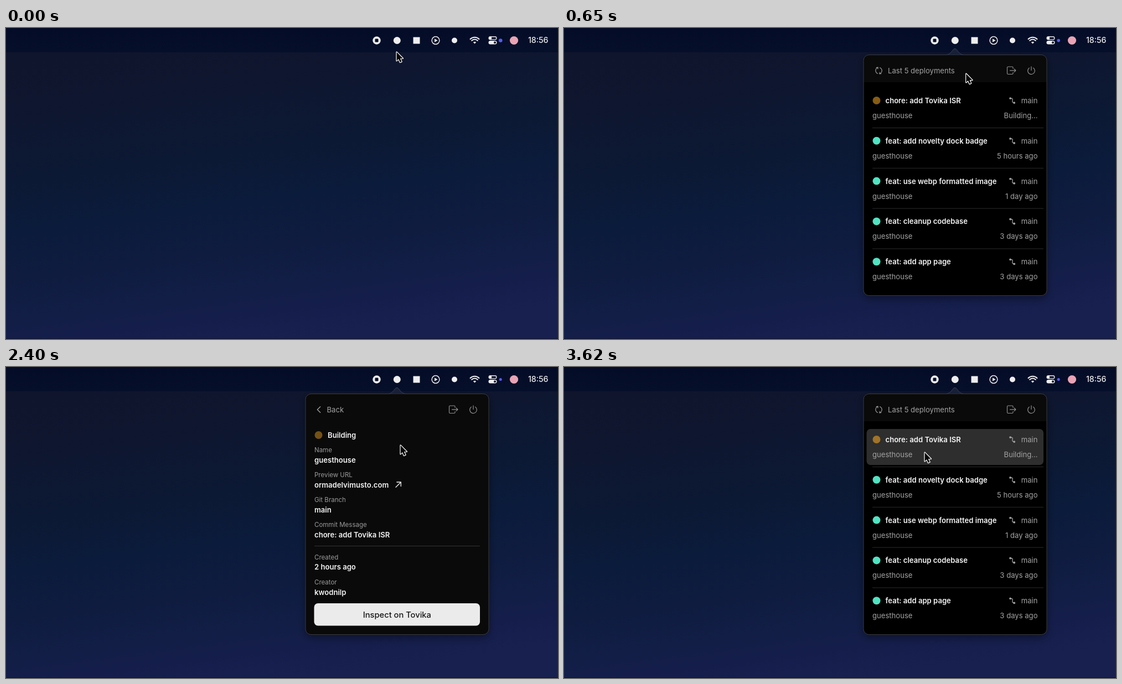
An HTML page with a canvas for the animation above (3.69 s loop, 997x562 px).

```html
<!DOCTYPE html>
<html lang="en">
<head>
<meta charset="utf-8">
<title>Deployments menu</title>
<style>
  html, body { margin: 0; width: 100%; height: 100%; overflow: hidden; background: #0c1a38; }
  canvas { display: block; width: 997px; height: 562px; }
</style>
</head>
<body>
<canvas id="stage" width="997" height="562"></canvas>
<script>
const ctx = document.getElementById('stage').getContext('2d');
const W = 997, H = 562, LOOP = 3690, STEP = 50;
const OPEN = 250, DETAIL = 1950, BACK = 3200;
const GREY = '#a3a3a3', WHITE = '#f5f5f5', GREEN = '#50e3c2', LINE = '#2b2b2b';
const PANEL = { x: 541, y: 48.5, w: 331, h: 435, r: 10 };
const ANCHOR = { x: 706, y: 38 };

const ROWS = [
  ['chore: add Tovika ISR', 'Building...'],
  ['feat: add novelty dock badge', '5 hours ago'],
  ['feat: use webp formatted image', '1 day ago'],
  ['feat: cleanup codebase', '3 days ago'],
  ['feat: add app page', '3 days ago'],
];
const FIELDS = [
  ['Name', 'guesthouse', 154],
  ['Preview URL', 'ormadelvimusto.com', 199],
  ['Git Branch', 'main', 244],
  ['Commit Message', ROWS[0][0], 289],
  ['Created', '2 hours ago', 347.5],
  ['Creator', 'kwodnilp', 393],
];

// time, x, y of the pointer tip
const POINTER = [
  [0, 705, 43], [150, 707, 24], [300, 708, 24], [450, 719, 48], [750, 728, 94],
  [1150, 729, 101], [1600, 728, 153], [2250, 728, 153], [2400, 712, 141],
  [2700, 603, 75], [3300, 603, 75], [3600, 651, 154], [LOOP, 651, 154],
];
const SCALE = [[OPEN - 50, 0.6], [350, 1.018], [550, 1], [LOOP, 1]];

const smooth = u => u * u * (3 - 2 * u);
const clamp = u => Math.min(1, Math.max(0, u));

function track(keys, t, i) {
  let k = 0;
  while (k < keys.length - 2 && t >= keys[k + 1][0]) k++;
  const a = keys[k], b = keys[k + 1];
  return a[i] + (b[i] - a[i]) * smooth(clamp((t - a[0]) / (b[0] - a[0])));
}

function text(str, x, y, color, size = 13.1, weight = 400, align = 'left') {
  ctx.font = `${weight} ${size}px Inter, sans-serif`;
  ctx.textAlign = align;
  ctx.fillStyle = color;
  ctx.fillText(str, x, y);
}

function disc(x, y, r, color) {
  ctx.fillStyle = color;
  ctx.beginPath();
  ctx.arc(x, y, r, 0, Math.PI * 2);
  ctx.fill();
}

function box(x, y, w, h, r, color) {
  ctx.fillStyle = color;
  ctx.beginPath();
  ctx.roundRect(x, y, w, h, r);
  ctx.fill();
}

function stroke(d, color, width = 1.2, x = 0, y = 0) {
  ctx.save();
  ctx.translate(x, y);
  ctx.strokeStyle = color;
  ctx.lineWidth = width;
  ctx.lineCap = ctx.lineJoin = 'round';
  ctx.stroke(new Path2D(d));
  ctx.restore();
}

function arc(x, y, r, from, to, color, width) {
  ctx.strokeStyle = color;
  ctx.lineWidth = width;
  ctx.lineCap = 'round';
  ctx.beginPath();
  ctx.arc(x, y, r, from * Math.PI, to * Math.PI);
  ctx.stroke();
}

function drawDesktop() {
  const sky = ctx.createLinearGradient(462, 0, 535, H);
  [[0, '#0f152c'], [0.15, '#0f162f'], [0.38, '#0c1934'], [0.54, '#0b1b3b'],
   [0.7, '#0f1c40'], [0.82, '#121e46'], [0.9, '#151e4b'], [1, '#17204f']]
    .forEach(([at, color]) => sky.addColorStop(at, color));
  ctx.fillStyle = sky;
  ctx.fillRect(0, 0, W, H);
  ctx.fillStyle = '#0b1026';
  ctx.fillRect(0, H - 1, W, 1);
  const bar = ctx.createLinearGradient(0, 0, 0, 44);
  bar.addColorStop(0, '#040c27');
  bar.addColorStop(1, '#060f2a');
  ctx.fillStyle = bar;
  ctx.fillRect(0, 0, W, 44);
}

function drawMenuBar(t) {
  const ink = '#eeeef0', dark = '#060e29';
  disc(669.5, 22.5, 7.2, ink);
  box(666.5, 19.5, 6, 6, 1.2, dark);
  disc(706.3, 22.5, 6.5, ink);
  box(735.5, 16.5, 12, 12, 0, ink);

  arc(776, 22.5, 6.9, 0, 2, ink, 1.5);
  ctx.fillStyle = ink;
  ctx.fill(new Path2D('M774 19.2L779.6 22.5L774 25.8Z'));
  disc(810, 22.5, 5, ink);

  [3.8, 7.5, 11.2].forEach((r, i) => {
    if (i) arc(846.5, 28, r, 1.25, 1.75, ink, 2.1);
  });
  ctx.fillStyle = ink;
  ctx.fill(new Path2D('M846.5 28.6L843.8 25.7Q846.5 23.6 849.2 25.7Z'));

  box(871.5, 15, 15, 6.6, 3.3, ink);
  box(875.5, 16.4, 9.6, 3.8, 1.9, dark);
  disc(875, 18.3, 2.2, ink);
  box(871.5, 23, 15, 6.6, 3.3, ink);
  disc(883, 26.3, 2, dark);

  disc(893.2, 22.5, 3.3 - 0.8 * clamp(t / 1100), '#5a5cf2');
  disc(917.5, 22.5, 7.6, '#e9a3b4');
  text('18:56', 979.5, 26.6, ink, 14.2, 500, 'right');
}

function panelPath() {
  const { x, y, w, h, r } = PANEL;
  const p = new Path2D();
  p.roundRect(x, y, w, h, r);
  return p;
}

function drawFrame(detail) {
  const shape = panelPath();
  ctx.save();
  ctx.shadowColor = 'rgba(0,0,0,.42)';
  ctx.shadowBlur = 15;
  ctx.shadowOffsetY = 5;
  ctx.fillStyle = '#0a0a0a';
  ctx.fill(shape);
  ctx.restore();

  if (!detail) {
    ctx.save();
    ctx.clip(shape);
    ctx.fillStyle = '#000';
    ctx.fillRect(PANEL.x, 98, PANEL.w, 400);
    ctx.restore();
  }
  ctx.strokeStyle = '#3b3b3d';
  ctx.lineWidth = 1;
  ctx.stroke(shape);

  const tip = 'M691 48.5C697 48 699 43.5 703.5 38.6Q706 36 708.5 38.6C713 43.5 715 48 721 48.5';
  ctx.fillStyle = '#182038';
  ctx.fill(new Path2D(tip + 'Z'));
  stroke(tip, '#3a4056', 1);
}

function drawHeaderIcons() {
  stroke('M811 73.2V71.5Q811 70 809.5 70H802Q800.5 70 800.5 71.5V82Q800.5 83.5 802 83.5H809.5Q811 83.5 811 82V80.3' +
    'M805.5 76.8H816M813.2 74L816 76.8L813.2 79.6', '#929292', 1.15);
  arc(844, 77.3, 6.3, -0.3, 1.3, '#929292', 1.2);
  stroke('M844 69.8V76.5', '#929292', 1.2);
}

function drawBranchIcon(x, y) {
  disc(x + 2.6, y + 2.4, 1.9, GREY);
  disc(x + 9.7, y + 10.4, 1.9, GREY);
  stroke('M3 2.4C7 2.4 7 4 6.5 6.2C6 8.8 6.4 10.4 9.6 10.4', GREY, 1.3, x, y);
}

function drawList(hover, amber) {
  if (hover.header) box(556, 62, 157.5, 29, 5, '#2c2c2c');
  arc(568.5, 77, 5.7, 0.62, 1.36, GREY, 1.15);
  arc(568.5, 77, 5.7, 1.62, 2.36, GREY, 1.15);
  stroke('M564.2 71.5L567.2 71.1L566.8 74M572.8 82.5L569.8 82.9L570.2 80', GREY, 1.1);
  text('Last 5 deployments', 585, 81.5, GREY);

  ROWS.forEach(([title, when], i) => {
    const y = 112 + 72.8 * i;
    if (i === 0 && hover.row) box(546.5, y, 319.5, 65, 7, '#2e2e2e');
    if (i < 4) {
      ctx.fillStyle = LINE;
      ctx.fillRect(557, y + 68, 309, 1);
    }
    if (i === 0) ctx.globalAlpha *= amber;
    disc(564.5, y + 19, 7, i ? GREEN : '#f5a623');
    if (i === 0) ctx.globalAlpha /= amber;
    text(title, 580.5, y + 24, WHITE, 13.1, 600);
    text('guesthouse', 557, y + 51, GREY);
    drawBranchIcon(803.5, y + 12.7);
    text('main', 855.5, y + 24, GREY, 13.1, 400, 'right');
    text(when, 855.5, y + 51, GREY, 13.1, 400, 'right');
  });
}

function drawDetail(hover, amber) {
  if (hover.back) box(556, 62, 60, 29, 5, '#2c2c2c');
  stroke('M567.7 71.7L562.3 77L567.7 82.3', GREY, 1.3);
  text('Back', 579.5, 81.5, GREY);

  ctx.globalAlpha = amber;
  disc(564.5, 123, 7, '#f5a623');
  ctx.globalAlpha = 1;
  text('Building', 581, 127.8, WHITE, 13.1, 600);

  for (const [label, value, y] of FIELDS) {
    text(label, 557, y, '#9b9b9b', 11.5);
    text(value, 557, y + 18.7, WHITE, 13.1, 600);
  }
  stroke('M704 217.3L713.3 208M705.8 208H713.3V215.5', WHITE, 1.3);
  ctx.fillStyle = '#343434';
  ctx.fillRect(557, 323, 299, 1);

  box(556.5, 427, 299.5, 40.5, 7, '#ebebeb');
  text('Inspect on Tovika', 706.3, 452.6, '#161616', 14.7, 500, 'center');
}

function drawPointer(x, y) {
  const arrow = new Path2D('M0 0V15.6L3.5 12.3L6.2 18.4L8.9 17.2L6.3 11.3H11.2Z');
  ctx.save();
  ctx.translate(x + 0.6, y + 0.6);
  ctx.lineJoin = 'round';
  ctx.lineWidth = 2.4;
  ctx.strokeStyle = '#fff';
  ctx.stroke(arrow);
  ctx.fillStyle = '#050505';
  ctx.fill(arrow);
  ctx.restore();
}

// The building light fades in and out, restarting with each view.
function pulse(t) {
  const start = t >= BACK ? BACK + 40 : t >= DETAIL ? DETAIL + 10 : OPEN + 25;
  return 0.65 + 0.35 * Math.cos(Math.max(0, t - start) / 1275 * Math.PI * 2);
}

function render(time) {
  const t = Math.floor((time % LOOP) / STEP) * STEP;
  const x = track(POINTER, t, 1), y = track(POINTER, t, 2);
  const inside = (l, top, r, bottom) => x >= l && x <= r && y >= top && y <= bottom;
  const hover = {
    header: inside(556, 62, 713, 91),
    back: inside(556, 62, 616, 91),
    row: inside(547, 112, 866, 177),
  };
  const detail = t >= DETAIL && t < BACK;

  ctx.clearRect(0, 0, W, H);
  drawDesktop();
  drawMenuBar(t);
  if (t >= OPEN) {
    const s = track(SCALE, t, 1);
    ctx.save();
    ctx.globalAlpha = clamp((t - OPEN + 50) / 120);
    ctx.translate(ANCHOR.x, ANCHOR.y);
    ctx.scale(s, s);
    ctx.translate(-ANCHOR.x, -ANCHOR.y);
    drawFrame(detail);
    drawHeaderIcons();
    (detail ? drawDetail : drawList)(hover, pulse(t));
    ctx.restore();
  }
  drawPointer(x, y);
}

const begin = performance.now();
function tick() {
  render(performance.now() - begin);
  requestAnimationFrame(tick);
}
tick();
</script>
</body>
</html>
```
